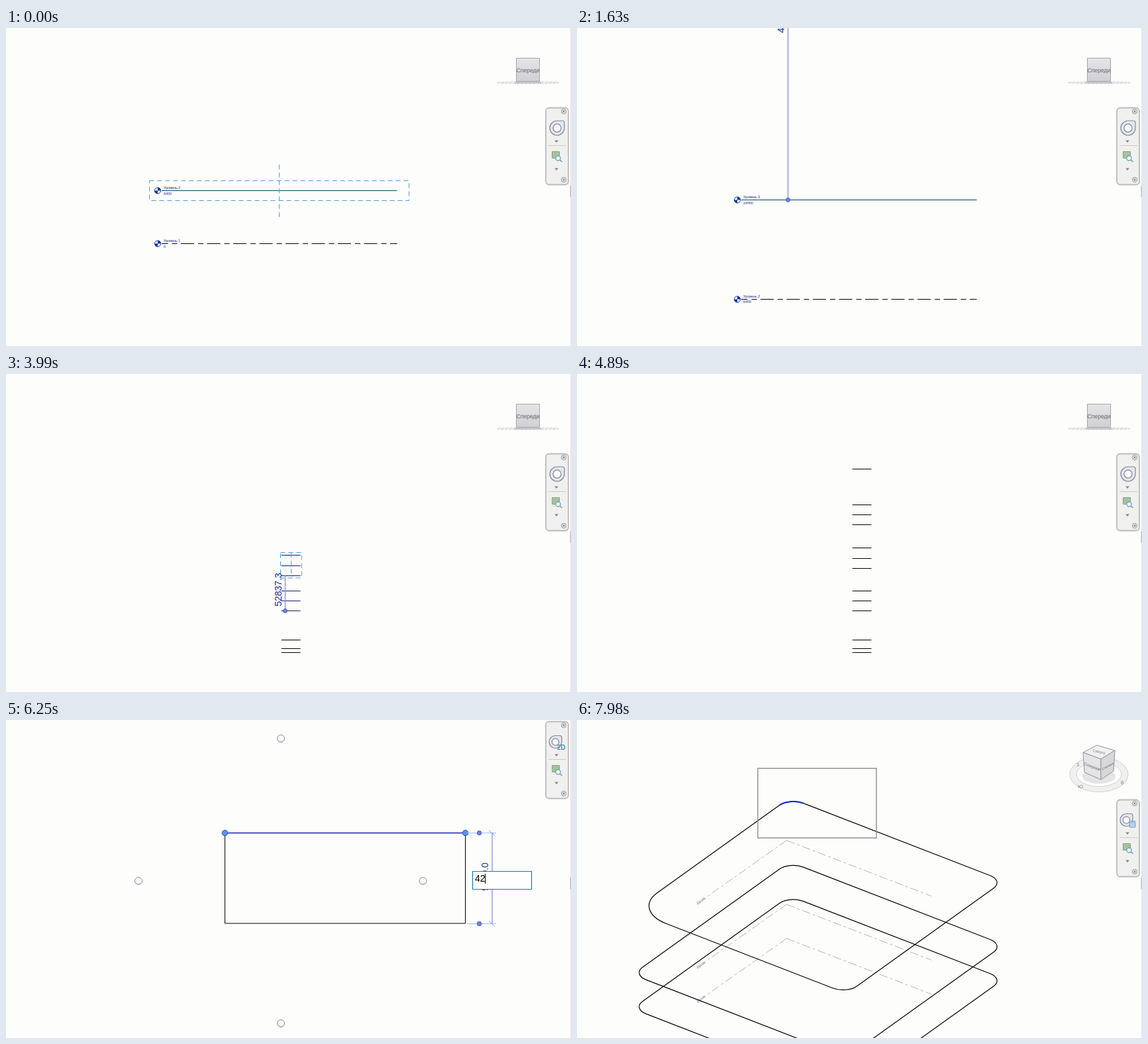
An HTML page with a canvas for the animation above (8 s loop, 853 by 480 pixels).

```html
<!DOCTYPE html>
<html lang="ru">
<head>
<meta charset="utf-8">
<title>Уровни и контуры</title>
<style>
html, body { margin: 0; width: 100%; height: 100%; overflow: hidden; background: #fdfdfc; }
canvas { display: block; width: 853px; height: 480px; }
</style>
</head>
<body>
<canvas id="stage" width="853" height="480"></canvas>
<script>
const ctx = document.getElementById('stage').getContext('2d');
const LOOP = 8000, PLAN_START = 5400, SPACE_START = 6800;
const SANS = '"Liberation Sans", Arial, sans-serif';
const PX_PER_MM = 0.012469;
const PAPER = '#fdfdfc', NAVY = '#1b2a8c', GUIDE = '#8494ea', BLUE = '#4a9ce8';

const clamp = v => Math.max(0, Math.min(1, v));
const ease = v => { v = clamp(v); return v * v * (3 - 2 * v); };
const span = (t, a, b) => ease((t - a) / (b - a));
const lerp = (a, b, u) => a + (b - a) * u;
const snap = v => Math.round(v) + 0.5;

// Rows are [time, ...values]; values are eased between rows.
function track(rows, t) {
  let i = 0;
  while (i < rows.length - 2 && t >= rows[i + 1][0]) i++;
  const [a, b] = [rows[i], rows[i + 1]];
  return a.slice(1).map((v, k) => lerp(v, b[k + 1], span(t, a[0], b[0])));
}

function paint(stroke, width = 1, fill, dash = []) {
  ctx.setLineDash(dash);
  if (fill) { ctx.fillStyle = fill; ctx.fill(); }
  if (stroke) { ctx.strokeStyle = stroke; ctx.lineWidth = width; ctx.stroke(); }
  ctx.setLineDash([]);
}
function poly(points, stroke, width, fill, dash, closed) {
  ctx.beginPath();
  points.forEach(([x, y]) => ctx.lineTo(x, y));
  if (closed) ctx.closePath();
  paint(stroke, width, fill, dash);
}
const line = (x1, y1, x2, y2, stroke, width, dash) =>
  poly([[x1, y1], [x2, y2]], stroke, width, null, dash);
function circle(x, y, r, stroke, fill, width = 1) {
  ctx.beginPath();
  ctx.arc(x, y, r, 0, 7);
  paint(stroke, width, fill);
}
function box(x, y, w, h, r, stroke, fill, width, dash) {
  ctx.beginPath();
  ctx.roundRect(x, y, w, h, r);
  paint(stroke, width, fill, dash);
}
function label(text, x, y, size, color, { align = 'left', angle = 0, weight = '', skew } = {}) {
  ctx.save();
  ctx.translate(x, y);
  ctx.rotate(angle);
  if (skew) ctx.transform(1, skew, 0, 1, 0, 0);
  ctx.font = `${weight} ${size}px ${SANS}`;
  ctx.textAlign = align;
  ctx.fillStyle = color;
  ctx.fillText(text, 0, 0);
  ctx.restore();
}

// ---------- elevation view ----------
const heights = [0, 6400, 18400, 62000, 77000, 92000, 125600, 140600, 155600, 190600, 205600, 220600, 273600];
const elevationCamera = [
  [0, 229, 325, 1], [1170, 229, 325, 1], [1330, 242, 488.5, 1], [1810, 242, 488.5, 1],
  [1970, 227, 1104, 1], [3560, 227, 1104, 1], [3820, 415.2, 420, 0.0812], [8000, 415.2, 420, 0.0812]
];
// from / to are level indices, count is how many levels are copied together
const copies = [
  { start: 250, end: 850, from: 1, to: 2, count: 1 },
  { start: 1350, end: 1800, from: 2, to: 3, count: 1 },
  { start: 2300, end: 2640, from: 3, to: 4, count: 1 },
  { start: 3230, end: 3520, from: 4, to: 5, count: 1 },
  { start: 3900, end: 4120, from: 3, to: 6, count: 3 },
  { start: 4250, end: 4450, from: 6, to: 9, count: 3 },
  { start: 4580, end: 4760, from: 11, to: 12, count: 1 }
];

function levelHead(x, y, r, color) {
  circle(x, y, r, color, '#fff');
  for (const a of [0, Math.PI]) {
    ctx.beginPath();
    ctx.moveTo(x, y);
    ctx.arc(x, y, r, a + Math.PI / 2, a + Math.PI);
    paint(null, 0, color);
  }
}
function drawLevel(index, height, cam, selected) {
  const [x, base, s] = cam;
  const y = base - height * PX_PER_MM * s, near = s > 0.3;
  if (y < -30 || y > 510) return;
  const color = !selected ? '#000' : index < 3 ? '#00485c' : '#10206c';
  const solid = selected || !near;
  ctx.lineDashOffset = 10.5;
  line(x + 6 * s, snap(y), x + 361.5 * s, snap(y), color, 1, solid ? [] : [20, 6, 8, 5.5]);
  ctx.lineDashOffset = 0;
  if (!near) return;
  levelHead(x, snap(y), 4.6 * s, selected && index > 2 ? '#1743d0' : index < 3 ? '#0a34a8' : '#000');
  label('Уровень ' + (index + 1), x + 9 * s, y - 2 * s, 5.4 * s, NAVY);
  label(height.toFixed(0), x + 9 * s, y + 6.6 * s, 5.4 * s, NAVY);
}
function copyFrame(low, high, cam) {
  const [x, base, s] = cam;
  const top = base - high * PX_PER_MM * s, bottom = base - low * PX_PER_MM * s;
  const pad = Math.max(15 * s, 4), dash = [7, 5];
  box(snap(x - 13 * s), snap(top - pad), 392 * s, bottom - top + 2 * pad, 0, BLUE, null, 1, dash);
  line(snap(x + 183 * s), top - 39 * s, snap(x + 183 * s), bottom + 41 * s, BLUE, 1, dash);
}
function drawElevation(t) {
  const cam = track(elevationCamera, t), [x, base, s] = cam;
  const active = copies.find(c => t >= c.start - 290 && t < c.end);
  const isSource = i => active && i >= active.from && i < active.from + active.count;
  const shown = copies.reduce((n, c) => t >= c.end ? c.to + c.count : n, 2);
  for (let i = 0; i < shown; i++) drawLevel(i, heights[i], cam, isSource(i));
  if (!active) return;

  const { start, end, from, to, count } = active;
  const low = heights[from], high = heights[from + count - 1];
  if (t < start) return copyFrame(low, high, cam);

  const shift = (heights[to] - low) * span(t, start, lerp(start, end, 0.56));
  for (let i = 0; i < count; i++) drawLevel(to + i, heights[from + i] + shift, cam, true);
  copyFrame(low + shift, high + shift, cam);
  const lx = snap(x + 76 * s), y1 = base - low * PX_PER_MM * s, y2 = y1 - shift * PX_PER_MM * s;
  line(lx, y1, lx, y2, GUIDE, 1.4);
  circle(lx, snap(y1), 3, '#4553c8', '#7383e8');
  label(shift.toFixed(1), lx - 6, (y1 + y2) / 2 - 5, 14, NAVY, { align: 'center', angle: -Math.PI / 2 });
}

// ---------- plan view ----------
function drawPlan(t) {
  const grow = span(t, 6420, 6480), zoom = span(t, 6490, 6570);
  ctx.save();
  ctx.translate(0, 150 * zoom);
  ctx.scale(lerp(1, 0.72, zoom), lerp(1, 0.72, zoom));
  for (const [x, y] of [[415, 28], [200, 243], [629.5, 243], [415, 458]]) {
    circle(x, y, 5.5, '#8d8d96', PAPER);
    ctx.beginPath();
    ctx.arc(x, y, 4.2, 0.6, 2.5);
    paint('#c4c4c8');
  }
  const draw = span(t, 5560, 5960);
  if (draw > 0) {
    const right = lerp(331, 693, draw);
    const top = lerp(lerp(307, 170, draw), -56, grow);
    const r = 24, corners = [0, 1, 2, 3].map(i => t >= 6580 + i * 50 ? r : 0);
    box(330.5, top + 0.5, right - 330, 306.5 - top, corners, '#000', null, 1);
    if (t < 6050) circle(right + 0.5, top + 0.5, 3, '#4553c8', '#7383e8');
    else if (t < 6560) drawHeightEditor(t, top);
  }
  ctx.restore();
}
function drawHeightEditor(t, top) {
  line(331, top + 0.5, 693, top + 0.5, '#1c1cb0', 1.4);
  for (const x of [330.5, 693.5]) circle(x, top + 0.5, 4.3, '#2a55b8', '#5f8fea');
  for (const y of [top + 0.5, 307.5]) {
    line(696, y, 740, y, '#9cbef4', 1);
    line(729, y - 4, 738, y + 4, GUIDE, 1);
    circle(714.5, y, 3.2, '#4553c8', '#7383e8');
  }
  line(734, top, 734, 307, GUIDE, 1.3);
  label(t < 6420 ? '9500.0' : '42000.0', 728, (top + 307) / 2 - 2, 14, '#1d3d98',
    { align: 'center', angle: -Math.PI / 2 });
  if (t < 6170 || t >= 6420) return;
  box(704.5, 228.5, 89, 27, 0, '#1f7a9c', '#fff', 1.2);
  const typed = '42000'.slice(0, Math.max(0, Math.floor((t - 6190) / 30)));
  label(typed, 708, 244, 14, '#000');
  ctx.font = `14px ${SANS}`;
  const caret = snap(708 + ctx.measureText(typed).width - 0.5);
  line(caret, 232, caret, 247, '#000', 1);
}

// ---------- 3D view ----------
const spaceCamera = [[6800, 0, 0], [7330, 0, 0], [7500, 60, 95.3], [8000, 60, 95.3]];
const SIDE_A = [323.3, 125.2], SIDE_B = [-237.3, 170], APEX = [261, 22.3];
const RADIUS = 0.064, WIDE_RADIUS = 0.157;

// Builds a path in unit-square coordinates seen in the slanted view.
function slanted(dy, build) {
  ctx.beginPath();
  ctx.save();
  ctx.transform(...SIDE_A, ...SIDE_B, APEX[0], APEX[1] + dy);
  build();
  ctx.restore();
}
function drawSpace(t) {
  const [dx, dy] = track(spaceCamera, t);
  const leftRadius = t >= 7700 ? WIDE_RADIUS : RADIUS;
  ctx.save();
  ctx.translate(dx, dy);
  for (const y of [148, 96.5, 0]) {
    const dash = [13, 4, 4, 4];
    line(256.5, 86.5 + y, 131, 175 + y, '#b4b4b8', 1, dash);
    line(256.5, 86.5 + y, 475, 170.5 + y, '#b4b4b8', 1, dash);
    label('Уров', 122, 184 + y, 6.5, '#9292a8', { angle: -0.65 });
    line(121, 183 + y, 134, 174 + y, '#acacc0', 1);
  }
  [[148, 0], [96.5, 6900], [0, 6980]].forEach(([y, from], i) => {
    if (t < from) return;
    const selected = i === 2 && t < 7200;
    slanted(y, () => ctx.roundRect(0, 0, 1, 1, [RADIUS, RADIUS, RADIUS, i === 2 ? leftRadius : RADIUS]));
    paint(selected ? '#000038' : '#000', 1.2);
  });
  if (t >= 7560 && t < 7780) {
    slanted(0, () => ctx.arc(leftRadius, 1 - leftRadius, leftRadius, Math.PI / 2, Math.PI));
    paint('#1c2fd0', 2);
  }
  if (t >= 7920) {
    slanted(0, () => ctx.arc(RADIUS, RADIUS, RADIUS, Math.PI, Math.PI * 1.5));
    paint('#1226c8', 2);
  }
  ctx.restore();
  const pull = span(t, 7800, 7960);
  if (pull > 0) box(273, 73, 179 * pull, 105 * pull, 0, '#929294', null, 1.5);
}

// ---------- interface ----------
function arrow(x, y) {
  poly([[x - 3, y - 1.5], [x + 3, y - 1.5], [x, y + 2]], null, 0, '#85858e', [], true);
}
function cornerButton(x, y) {
  circle(x, y, 3.8, '#a4a4ac', '#dededf');
  line(x - 1.7, y - 1.7, x + 1.7, y + 1.7, '#85858e', 1);
  line(x + 1.7, y - 1.7, x - 1.7, y + 1.7, '#85858e', 1);
}
function drawNavBar(mode) {
  ctx.save();
  ctx.translate(0, mode === 'plan' ? -118 : 0);
  box(815, 120.5, 34, 116, 5, '#bcbcc0', '#f0f0ee', 1.8);
  cornerButton(842, 126);
  cornerButton(842, 229);
  const small = mode !== 'elevation', cx = small ? 829.5 : 832, r = small ? 9.5 : 11;
  box(cx - r, 151 - r, 2 * r, 2 * r, [r, 3, r, r], '#8088a0', '#e4e6ea', 1.2);
  circle(cx, 151, r * 0.55, '#8088a0', '#fafafa', 1.2);
  if (mode === 'plan') label('2D', 832, 163, 10, '#4a8fb4', { weight: 'bold' });
  if (mode === 'space') {
    box(834, 154, 9, 8, 1, '#7c9cc4', '#b4d2ee', 1);
    line(836, 152.5, 844, 152.5, '#90acd0', 1);
  }
  arrow(831, 171);
  line(819, 177.5, 846, 177.5, '#cacacc', 1);
  box(824.5, 186.5, 11, 10, 0, '#8aa08a', '#a5c39c', 1);
  circle(833.5, 196.5, 3.6, '#5c9cb8', '#eef8fc', 1.2);
  line(836, 199, 839.5, 202, '#5c9cb8', 1.6);
  arrow(831, 213);
  ctx.restore();
}
function drawFrontCube() {
  ctx.beginPath();
  ctx.ellipse(788, 82.5, 47, 1.5, 0, 0, 7);
  paint('#d0d0d4', 1, '#ececec', [4, 2]);
  line(768, 82.5, 808, 82.5, '#bcbcc0', 2);
  const shade = ctx.createLinearGradient(0, 45, 0, 81);
  shade.addColorStop(0, '#e6e6e8');
  shade.addColorStop(1, '#d0d0d4');
  box(770.5, 45.5, 35, 35, 0, '#a4a4aa', shade, 1);
  label('Спереди', 788, 67, 8.6, '#66666c', { align: 'center' });
}
function drawSpaceCube() {
  const ring = (rx, ry, fill) => {
    ctx.beginPath();
    ctx.ellipse(788, 82, rx, ry, 0, 0, 7);
    paint('#d0d0d2', 1, fill);
  };
  ring(44, 26.5, '#f0f0ee');
  ring(34, 18.5, PAPER);
  ctx.beginPath();
  ctx.ellipse(788, 85, 25, 11, 0, 0, 7);
  paint(null, 0, '#e4e4e4');
  const A = [764, 49], B = [785, 38], C = [812, 46], D = [791, 59];
  const E = [766, 79], F = [791, 90], G = [810, 77];
  const face = (points, fill) => poly(points, '#94949a', 1, fill, [], true);
  face([A, B, C, D], '#f0f0f0');
  face([A, D, F, E], '#e4e4e6');
  face([D, C, G, F], '#d8d8dc');
  label('Сверху', 779, 48, 5.5, '#7c7c84', { skew: 0.2 });
  label('Спереди', 766, 68, 6, '#606068', { skew: 0.36 });
  label('Справа', 793, 76, 5, '#606068', { skew: -0.55 });
  label('З', 754, 70, 7, '#808088');
  label('Ю', 756, 103, 8, '#808088');
  label('В', 821, 97, 7, '#808088');
}

function render(t) {
  ctx.fillStyle = PAPER;
  ctx.fillRect(0, 0, 853, 480);
  const mode = t < PLAN_START ? 'elevation' : t < SPACE_START ? 'plan' : 'space';
  ({ elevation: drawElevation, plan: drawPlan, space: drawSpace })[mode](t);
  if (mode === 'elevation') drawFrontCube();
  if (mode === 'space') drawSpaceCube();
  drawNavBar(mode);
  line(852.5, 0, 852.5, 480, '#e6e6e8', 1);
  line(852.5, 238, 852.5, 255, '#bebec6', 2);
}

const began = performance.now();
function tick() {
  render((performance.now() - began) % LOOP);
  requestAnimationFrame(tick);
}
tick();
</script>
</body>
</html>
```
